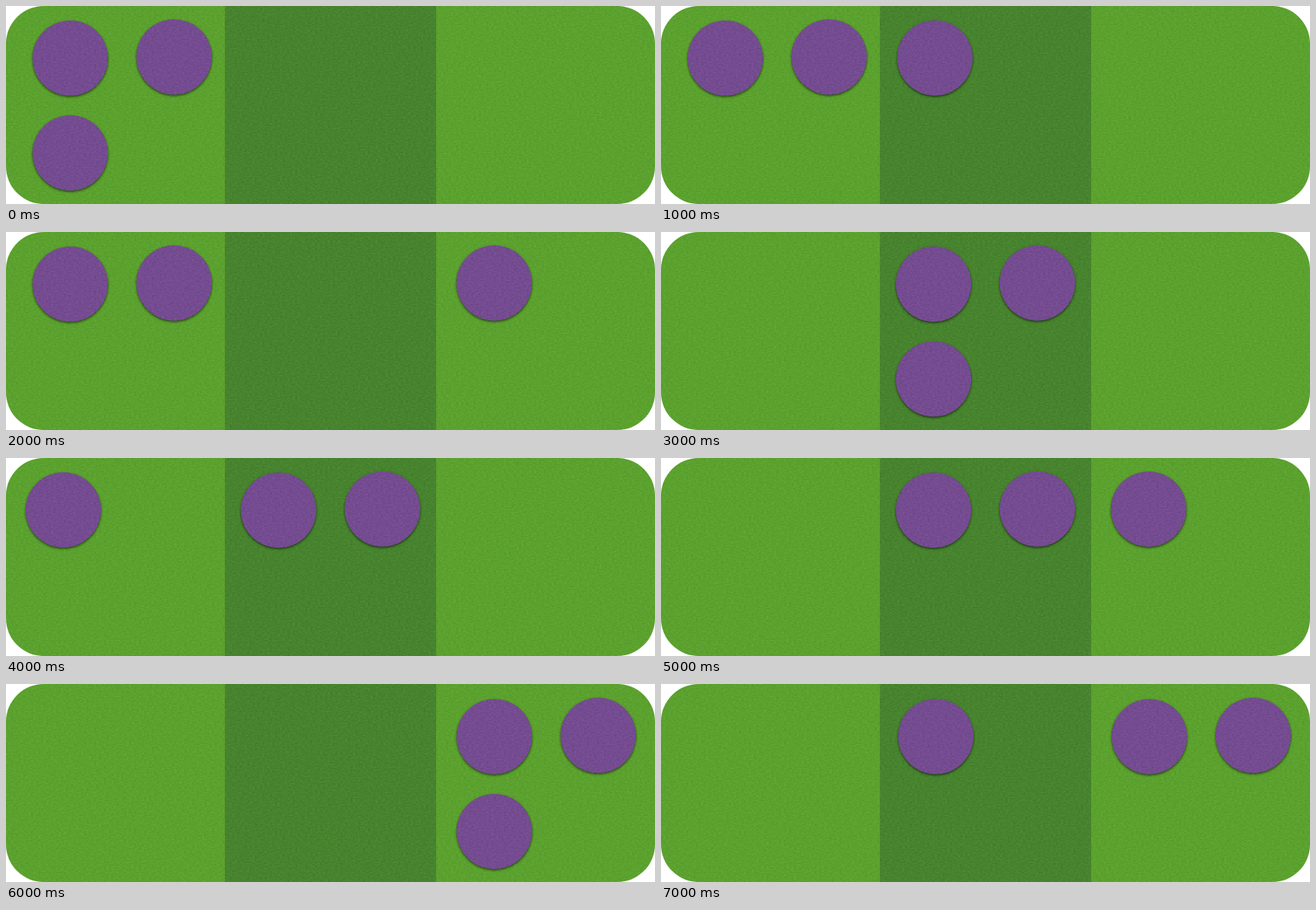
These frames come from a looping animation (860x263 px, 8 s). An HTML page:

```html
<!DOCTYPE html>
<html lang="en">
<head>
<meta charset="utf-8">
<title>Three counters on felt</title>
<style>
  html, body { margin: 0; height: 100%; overflow: hidden; background: #fff; }
  svg { display: block; width: 860px; height: 263px; }
  .felt { mix-blend-mode: overlay; }
</style>
</head>
<body>
<svg viewBox="0 0 860 263">
  <defs>
    <clipPath id="board"><rect width="860" height="263" rx="50"/></clipPath>
    <filter id="grain" x="0" y="0" width="1" height="1" color-interpolation-filters="sRGB">
      <feTurbulence type="fractalNoise" baseFrequency=".3 .5" numOctaves="3" seed="4"/>
      <feColorMatrix values=".13 0 0 0 .437  .13 0 0 0 .437  .13 0 0 0 .437  0 0 0 0 1"/>
    </filter>
    <filter id="shadow" x="-10%" y="-10%" width="120%" height="120%" color-interpolation-filters="sRGB">
      <feDropShadow dx="0" dy="1.5" stdDeviation="1.5" flood-color="#000" flood-opacity=".6"/>
    </filter>
  </defs>
  <g clip-path="url(#board)">
    <rect width="860" height="263" fill="#5ba12e"/>
    <rect x="290" width="280" height="263" fill="#47832e"/>
    <g id="discs" fill="#744b90"></g>
    <rect class="felt" width="860" height="263" filter="url(#grain)"/>
  </g>
</svg>
<script>
  const STEP = 1000;
  const trio = (x, y = 0) => [[x, 69.3 + y], [x + 137.6, 67.7 + y], [x, 195.3 + y]];
  const left = trio(85.2), middle = trio(361.2), right = trio(647.2, 0.6);

  // Each arrangement splits three discs between the panels.
  const arrangements = [
    left,
    [left[0], left[1], [363, 69]],
    [left[0], left[1], [647, 67.8]],
    middle,
    [[76, 69], middle[0], middle[1]],
    [middle[0], middle[1], [646.2, 67.9]],
    right,
    [[364.2, 69.7], right[0], right[1]],
  ];

  const group = document.getElementById("discs");
  let shown = -1;

  function draw(now) {
    const step = Math.floor(now / STEP) % arrangements.length;
    if (step !== shown) {
      shown = step;
      group.innerHTML = arrangements[step]
        .map(([x, y]) => `<circle cx="${x}" cy="${y}" r="50" filter="url(#shadow)"/>`)
        .join("");
    }
    requestAnimationFrame(draw);
  }
  draw(0);
</script>
</body>
</html>
```
